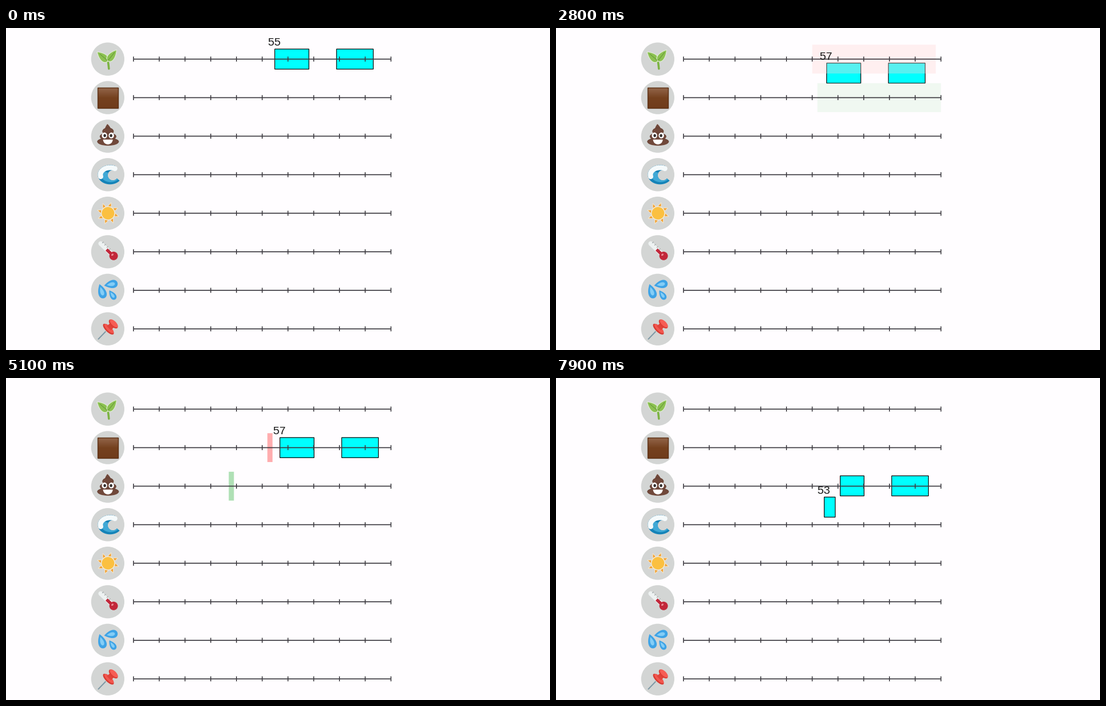
Animation, 956 px wide and 567 px high, one loop 8000 ms. Source, as a matplotlib script:

```python
import math
import numpy as np
import matplotlib.pyplot as plt
from matplotlib.animation import FuncAnimation
from matplotlib.colors import LinearSegmentedColormap
from matplotlib.patches import Circle, Ellipse, Polygon, Rectangle, Wedge

W, H, DPI = 956, 567, 100
STEP, LOOP = 100, 8000
PX = 72 / DPI
X0, UNIT = 224.1, 4.524
ROW0, PITCH = 54.75, 67.86
ICON_X = 178.8
BAR_H, BAND_H = 35.4, 50.8
MOVE, GLOW = 1360, 660
INK = "#3c3a40"

fig = plt.figure(figsize=(W / DPI, H / DPI), dpi=DPI, facecolor="#fffdff")
ax = fig.add_axes([0, 0, 1, 1])
ax.axis("off")


def x_at(value):
    return X0 + UNIT * value


def y_at(row):
    return ROW0 + PITCH * row


# ---- icon helpers: (u, v) is relative to the badge centre ----
def oval(row, u, v, w, h, color, angle=0):
    ax.add_patch(Ellipse((ICON_X + u, y_at(row) + v), w, h, angle=angle,
                         fc=color, lw=0, zorder=1.2))


def stroke(row, u0, v0, u1, v1, color, width, cap="round"):
    y = y_at(row)
    ax.plot([ICON_X + u0, ICON_X + u1], [y + v0, y + v1], color=color,
            lw=width * PX, solid_capstyle=cap, zorder=1.2)


def outline(row, u, v, color, edge="none"):
    pts = np.column_stack([ICON_X + u, y_at(row) + v])
    ax.add_patch(Polygon(pts, fc=color, ec=edge, lw=1.2 * PX, zorder=1.2))


def drop(row, u, v, length, width, angle, color, edge="none"):
    """Teardrop around (u, v) whose tip points along the angle."""
    t = np.linspace(0, 2 * math.pi, 60)
    a = math.radians(angle)
    p = length / 2 * np.cos(t)
    q = width * 0.62 * np.sin(t) * np.sin(t / 2)
    outline(row, u + p * math.cos(a) - q * math.sin(a),
            v + p * math.sin(a) + q * math.cos(a), color, edge)


def seedling(r):
    t = np.linspace(0, 1, 20)
    ax.plot(ICON_X - 1 + 3 * np.sqrt(t), y_at(r) + 1 + 16 * t, color="#7cb342",
            lw=3.6 * PX, solid_capstyle="round", zorder=1.2)
    drop(r, -9.5, -4.5, 25, 14, 222, "#8cc152", "#e2ecd8")
    drop(r, 8, -6.5, 25, 13, -52, "#8cc152", "#e2ecd8")
    stroke(r, -14, -9, -1, 2, "#6a9f38", 1.2)
    stroke(r, 12, -12, 1, 2, "#6a9f38", 1.2)


def soil(r):
    cmap = LinearSegmentedColormap.from_list("soil", ["#93664b", "#75411f", "#6f3c1b"])
    x, y, half = ICON_X + 0.4, y_at(r) + 0.4, 17.8
    ax.imshow(np.linspace(0, 1, 64)[:, None], cmap=cmap, aspect="auto", zorder=1.2,
              extent=(x - half, x + half, y + half, y - half))
    ax.add_patch(Rectangle((x - half, y - half), 2 * half, 2 * half, fill=False,
                           ec="#5a2f14", lw=1.4 * PX, zorder=1.3))


def pile(r):
    brown, dark = "#70483a", "#5c3a2f"
    drop(r, 0, -14, 15, 11, -95, brown)
    for k in range(3):
        oval(r, 0.5, -8.5 + 9 * k, 20 + 9 * k, 13, dark)
        oval(r, 0.5, -7.8 + 9 * k, 19 + 9 * k, 13, brown)
    for u in (-5.7, 6.3):
        oval(r, u, -1.2, 9.4, 10.4, "white")
        oval(r, u * 0.92, -1, 4.6, 5.4, "#33302f")
    ax.add_patch(Wedge((ICON_X + 0.3, y_at(r) + 6), 8.5, 0, 180, fc="white",
                       lw=0, zorder=1.2))


def wave(r):
    a = np.radians(np.linspace(-62, -322, 60))
    c, s = np.cos(a), np.sin(a)
    outline(r, np.r_[4 + 21.5 * c, (9 + 9 * c)[::-1]],
            np.r_[17 * s, (1 + 9 * s)[::-1]], "#1583b8")
    outline(r, np.r_[5 + 17 * c, (9 + 9 * c)[::-1]][20:-20],
            np.r_[13 * s, (1 + 9 * s)[::-1]][20:-20], "#3fa9d6")
    for angle in np.radians(np.linspace(165, 300, 12)):
        oval(r, 4 + 17 * math.cos(angle), 12.5 * math.sin(angle), 9, 9, "#f5fafb")


def sun(r):
    for k in range(8):
        a = math.radians(12 + 45 * k) + np.array([-0.28, 0.08, 0.28])
        d = np.array([12.4, 19.6, 12.4])
        outline(r, 0.5 + d * np.cos(a), d * np.sin(a), "#f3a030", "#f0e4cc")
    oval(r, 0.5, 0, 25, 25, "#f0e8d8")
    oval(r, 0.5, 0, 22, 22, "#fbc040")


def thermometer(r):
    stroke(r, -12.5, -14.5, 8, 5, "#eef2f2", 8)
    stroke(r, -2, -4, 8, 5.5, "#c2273a", 5.4, "butt")
    for u in range(-11, 2, 4):
        stroke(r, u + 1.4, u - 4.4, u + 3.4, u - 6.2, "#8c9496", 0.9)
    oval(r, 10.3, 7.3, 15, 15, "#c2273a")
    oval(r, 8.2, 5.2, 4.4, 3, "#ec8f98", -40)


def drops(r):
    for u, v, length, width, angle in ((5.5, -10.5, 24, 15, 170),
                                       (-10.5, 1.5, 26, 15, 252),
                                       (8, 8, 19, 11, 236)):
        drop(r, u, v, length, width, angle, "#3ea3e6")
        drop(r, u, v, length * 0.6, width * 0.45, angle, "#84cdf6")


def pin(r):
    stroke(r, -16.5, 18, -4, 5, "#7d98a5", 2)
    for shift, color in ((0, "#d8382f"), (1, "#f2574f")):
        oval(r, 1.2 + shift, 0.5 - shift, 25 - 3 * shift, 10 - 2 * shift, color, 45)
    stroke(r, 2, -1, 9, -8, "#e0433b", 10, "butt")
    for shift, color in ((0, "#dd3d35"), (1, "#f65d55")):
        oval(r, 9.8 + shift, -8.6 - shift, 20 - 2 * shift, 10 - 2 * shift, color, 45)


ICONS = [seedling, soil, pile, wave, sun, thermometer, drops, pin]
for row, icon in enumerate(ICONS):
    y = y_at(row)
    ax.add_patch(Circle((ICON_X, y), 29.2, fc="#d3d5d4", lw=0, zorder=1))
    icon(row)
    ax.plot([x_at(0), x_at(100)], [y, y], color=INK, lw=1.7 * PX,
            solid_capstyle="butt", snap=False, zorder=3)
    ax.vlines([x_at(v) for v in range(0, 101, 10)], y - 4.4, y + 4.4,
              color=INK, lw=1.6 * PX, snap=False, zorder=3)

ax.set_xlim(0, W)
ax.set_ylim(H, 0)

# ---- moving parts ----
# start time, row of the upper band, destination, origin, length
MAPS = [(1300, 0, 50, 98, 2), (2300, 0, 52, 50, 48), (3900, 1, 0, 15, 37),
        (4800, 1, 37, 52, 2), (5800, 1, 39, 0, 15), (7300, 2, 49, 53, 8)]
RED, GREEN = np.array([1, 0, 0]), np.array([0, 0.64, 0.08])

bars = [ax.add_patch(Rectangle((0, 0), 1, BAR_H, fc="#00ffff", ec="black",
                               lw=1.2 * PX, snap=False, zorder=2)) for _ in range(3)]
bands = [ax.add_patch(Rectangle((0, 0), 1, BAND_H, alpha=0.35, lw=0,
                                snap=False, zorder=2.5)) for _ in range(2)]
label = ax.text(0, 0, "", family="Liberation Mono", size=20 * PX, color="#1c1c1c",
                ha="center", va="baseline", zorder=4)


def ease(t):
    """Cubic Bezier (0.25, 0.1, 0.25, 1), sampled along its parameter."""
    s = np.linspace(0, 1, 400)
    x = 0.75 * s * (1 - s) + s ** 3
    y = 0.3 * s * (1 - s) ** 2 + 3 * s * s * (1 - s) + s ** 3
    return float(np.interp(t, x, y))


def ranges(t):
    """Label value and the (start, length, row) of every bar."""
    shift = ease((t - 2487) / MOVE) if t >= 2800 else 0
    row = shift + ease((t - 6700) / MOVE)
    far = (79 + 2 * shift, 14, row)
    if t < 7500:
        return (55 if t < 2800 else 57), [(55 + 2 * shift, 13, row), far]
    hop = ease((t - 7465) / MOVE)
    return 53, [(57 - 4 * hop, 4, row + hop), (61, 9, row), far]


def glow(t):
    """Strength, (start, row, tint) of both bands, and their length."""
    for start, row, dest, origin, size in MAPS:
        phase = (t - start + 125) / GLOW
        if t >= start and phase < 1:
            k = math.sin(math.pi * phase)
            return k, [(origin, row, RED), (dest, row + 1, GREEN)], size
    return 0, [], 0


def draw(i):
    t = i * STEP
    value, parts = ranges(t)
    for n, bar in enumerate(bars):
        bar.set_visible(n < len(parts))
    for bar, (a, size, row) in zip(bars, parts):
        bar.set_xy((x_at(a) - 0.6, y_at(row) - BAR_H / 2))
        bar.set_width(size * UNIT + 1.2)
    a, _, row = parts[0]
    label.set_text(str(value))
    label.set_position((x_at(a) - 1, y_at(row) - 23.5))

    k, spans, size = glow(t)
    for band in bands:
        band.set_visible(bool(spans))
    for band, (a, row, tint) in zip(bands, spans):
        band.set_xy((x_at(a), y_at(row) - BAND_H / 2))
        band.set_width(size * UNIT)
        band.set_facecolor(1 - k * (1 - tint))
    return bars + bands + [label]


anim = FuncAnimation(fig, draw, frames=LOOP // STEP, interval=STEP,
                     repeat=True, repeat_delay=0, blit=False)
plt.show()
```
